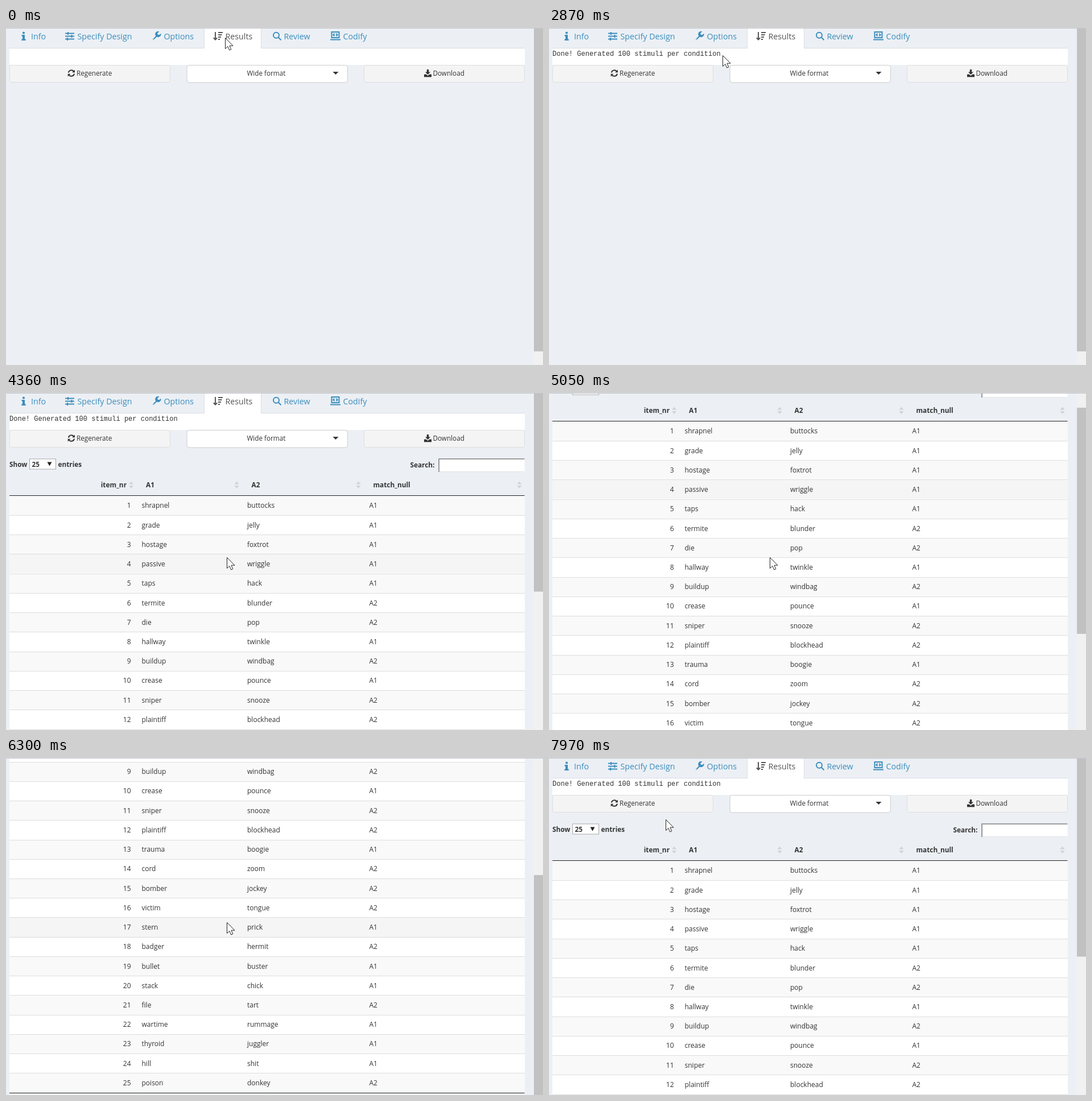
An HTML page for the animation above (8 s loop, 944x593 px).

```html
<!DOCTYPE html>
<html lang="en">
<head>
<meta charset="utf-8">
<title>Stimulus results</title>
<style>
@property --s { syntax: '<number>'; inherits: true; initial-value: 0; }
html, body { margin: 0; width: 100%; height: 100%; overflow: hidden; background: #ecf0f5; }
svg { display: block; width: 944px; height: 593px; animation: scroll 8s linear infinite; }
text { font: 12px "Open Sans", "Noto Sans", sans-serif; fill: #333; white-space: pre; }
.tabs text { font-size: 14.25px; fill: #3c8dbc; }
.tabs .on { fill: #555; }
.btn text { font-size: 11.7px; }
.bold { font-size: 11.8px; font-weight: 700; }
#msg { font: 12.03px "Liberation Mono", "DejaVu Sans Mono", monospace; }
.num { text-anchor: end; }
.ico { fill: none; stroke: #3c8dbc; stroke-width: 2; }
.solid { fill: #3c8dbc; stroke: none; }
.dark { stroke: #333; }
#page { transform: translateY(calc(var(--s) * -1px)); }
#thumb { transform: translateY(calc(var(--s) * .568px)); }
.late { animation: appear 8s step-end infinite; }
.early { animation: vanish 8s step-end infinite; }
#hover { fill: #f5f5f5; animation: hover 8s step-end infinite; }
#cursor { animation: move 8s linear infinite; }
@keyframes scroll {
  0%, 60.5% { --s: 0; }
  67.875%, 68.5% { --s: 366; }
  70.125%, 72.9% { --s: 400; }
  73.625%, 80.2% { --s: 448; }
  83.5%, 84.125% { --s: 176; }
  86.375%, 100% { --s: 0; }
}
@keyframes appear { 0% { visibility: hidden; } 37.125%, 100% { visibility: visible; } }
@keyframes vanish { 0% { visibility: visible; } 37.125%, 100% { visibility: hidden; } }
@keyframes hover {
  0% { transform: translateY(-2000px); }
  50.6% { transform: translateY(0); }
  51.5% { transform: translateY(34px); }
  52.5% { transform: translateY(68px); }
  54% { transform: translateY(102px); }
  78.75% { transform: translateY(548px); }
  86.375% { transform: translateY(102px); }
  92% { transform: translateY(68px); }
  94.5% { transform: translateY(34px); }
  95.5% { transform: translateY(0); }
  96.375%, 100% { transform: translateY(-2000px); }
}
@keyframes move {
  0%, 23.75% { transform: translate(385px, 17px); }
  27.5% { transform: translate(396px, 6px); }
  30.6% { transform: translate(365px, 18px); }
  33.625%, 34.9% { transform: translate(322px, 39px); }
  35.875%, 46.2% { transform: translate(305px, 48px); }
  49.4% { transform: translate(380px, 130px); }
  51.9% { transform: translate(420px, 228px); }
  54.5%, 91.2% { transform: translate(388px, 289px); }
  93.75% { transform: translate(560px, 262px); }
  95.5% { transform: translate(628px, 215px); }
  97.25% { transform: translate(520px, 150px); }
  99.625%, 100% { transform: translate(205px, 108px); }
}
</style>
</head>
<body>
<svg viewBox="0 0 944 593">
  <rect width="944" height="593" fill="#ecf0f5"/>
  <g id="page">
    <g class="tabs">
      <path d="M6 35.5H912" stroke="#d9dde2"/>
      <path d="M348.5 36V-2H448.5V36" fill="#fff" stroke="#dcdfe3"/>
      <rect x="6" y="36" width="906" height="29" fill="#fff"/>
      <rect x="349" y="34" width="99" height="3" fill="#fff"/>
      <text x="44" y="20">Info</text>
      <text x="125.5" y="20">Specify Design</text>
      <text x="277.5" y="20">Options</text>
      <text class="on" x="385.5" y="20">Results</text>
      <text x="488.5" y="20">Review</text>
      <text x="592.5" y="20">Codify</text>
      <circle class="solid" cx="31" cy="8.5" r="2.1"/>
      <path class="solid" d="M27.5 12H33V19.5H34.7V22H27.3V19.5H29V14.5H27.5Z"/>
      <path class="ico" d="M104 9.5H120M104 14.5H120M104 19.5H120" stroke-width="1.8"/>
      <path class="ico" d="M109 7V12M115.5 12V17M108 17V22" stroke-width="2.6"/>
      <path class="ico" d="M259 20L266 13" stroke-width="4" stroke-linecap="round"/>
      <path class="solid" d="M269.5 6.2A5.2 5.2 0 1 0 272.4 9.6L269.4 12.2 266.6 11.6 266.2 9Z"/>
      <circle cx="259.3" cy="19.8" r=".8" fill="#ecf0f5"/>
      <path class="ico on" d="M368 7V20M364.8 17.3L368 20.6 371.2 17.3M373 8H381M373 12H379.5M373 16H378M373 20H376" style="stroke:#555;fill:none"/>
      <circle class="ico" cx="475" cy="12.7" r="5" stroke-width="2.4"/>
      <path class="ico" d="M478.8 16.5L483.5 21.2" stroke-width="3"/>
      <rect class="ico" x="572.5" y="7" width="13" height="10"/>
      <path class="ico" d="M570 20.5H588"/>
      <path class="ico" d="M577.6 9.8L575.4 12 577.6 14.2M580.4 9.8L582.6 12 580.4 14.2" stroke-width="1.4"/>
    </g>
    <text id="msg" x="6" y="49"></text>
    <g class="btn">
      <rect x="6.5" y="65.5" width="282" height="30" rx="3" fill="#f4f4f4" stroke="#ddd"/>
      <rect x="318" y="65.5" width="282.5" height="30.5" rx="4" fill="#fff" stroke="#ccc"/>
      <rect x="629.5" y="65.5" width="282" height="30" rx="3" fill="#f4f4f4" stroke="#ddd"/>
      <text x="124" y="84">Regenerate</text>
      <text x="423.5" y="84">Wide format</text>
      <text x="750.5" y="84">Download</text>
      <path class="ico dark" d="M109.8 78.5A5.2 5.2 0 0 1 119 76.2M120 80.5A5.2 5.2 0 0 1 110.8 82.8"/>
      <path d="M121 73.5V78.3H116.2ZM108.7 85.6V80.8H113.5Z" fill="#333"/>
      <path d="M574.5 77H584.5L579.5 82Z" fill="#333"/>
      <path d="M739.8 73H743.2V77.5H746L741.5 82 737 77.5H739.8ZM735 81.5H738.6L741.5 84 744.4 81.5H748V86.3H735Z" fill="#333"/>
    </g>
    <g class="late">
      <text class="bold" x="6" y="129.5">Show</text>
      <rect x="41.5" y="116" width="46" height="18" fill="#fff" stroke="#a9a9a9"/>
      <text class="bold" x="45.5" y="129.5">25</text>
      <path d="M72.5 121.5H80.5L76.5 128.5Z" fill="#222"/>
      <text class="bold" x="91.5" y="129.5">entries</text>
      <text class="bold" x="710.5" y="131">Search:</text>
      <rect x="760" y="115" width="151.5" height="24" fill="#fff"/>
      <path d="M911 138.5H761" stroke="#e3e3e3"/>
      <path d="M761 139V116H911.5" fill="none" stroke="#7f7f7f" stroke-width="1.6"/>
      <text class="bold num" x="212" y="166">item_nr</text>
      <text class="bold" x="246" y="166">A1</text>
      <text class="bold" x="431.5" y="166">A2</text>
      <text class="bold" x="645.5" y="166">match_null</text>
      <g id="sorts" fill="#d0d4d9"></g>
      <g id="stripes"></g>
      <rect id="hover" x="6" y="181" width="906" height="34"/>
      <g id="rows"></g>
      <path d="M6 180.5H911.5M6 1037.5H911.5" stroke="#222"/>
    </g>
  </g>
  <rect x="928" width="16" height="593" fill="#f1f1f1"/>
  <rect class="early" x="928" width="16" height="569" fill="#c1c1c1"/>
  <g class="late"><rect id="thumb" x="928" y="-48.5" width="16" height="398" fill="#c1c1c1"/></g>
  <path d="M0 .5H944" stroke="#c3c7cf"/>
  <path id="cursor" d="M.5 .5V19.5L4.9 15.4 7.7 22 10.8 20.7 8 14.2H14Z" fill="#fff" stroke="#222"/>
</svg>
<script>
const LOOP = 8000, PITCH = 34.23;
const first = ('shrapnel grade hostage passive taps termite die hallway buildup crease sniper plaintiff ' +
  'trauma cord bomber victim stern badger bullet stack file wartime thyroid hill poison').split(' ');
const second = ('buttocks jelly foxtrot wriggle hack blunder pop twinkle windbag pounce snooze blockhead ' +
  'boogie zoom jockey tongue prick hermit buster chick tart rummage juggler shit donkey').split(' ');
const match = '1111122121221222121121112';
const get = id => document.getElementById(id);
const label = (x, y, s, cls = '') => `<text x="${x}" y="${y}" class="${cls}">${s}</text>`;
const edge = i => Math.round(180.8 + PITCH * i);

let stripes = '', rows = '';
first.forEach((word, i) => {
  const top = edge(i), bottom = edge(i + 1), y = Math.round(202.4 + PITCH * i);
  stripes += `<rect x="6" y="${top}" width="906" height="${bottom - top}" fill="${i % 2 ? '#fff' : '#f9f9f9'}"/>`;
  rows += `<path d="M6 ${bottom + .5}H912" stroke="#ddd"/>` +
    label(219.5, y, i + 1, 'num') + label(238.5, y, word) +
    label(424, y, second[i]) + label(638.5, y, 'A' + match[i]);
});
get('stripes').innerHTML = stripes;
get('rows').innerHTML = rows;
get('sorts').innerHTML = [220, 405.5, 619.5, 902.5].map(x =>
  `<path d="M${x - 4} 160.5h8l-4 -5zM${x - 4} 163h8l-4 5z"/>`).join('');

// start time, items generated, iterations
const counts = [[490, 14, 16], [690, 20, 23], [870, 27, 30], [1200, 35, 40], [1430, 42, 48], [1610, 50, 56],
  [1940, 59, 66], [2080, 66, 74], [2220, 74, 84], [2360, 82, 93], [2500, 90, 103], [2640, 97, 111]];

function message(t) {
  if (t < 180) return '';
  if (t < 490) return 'Generating...';
  if (t >= 2820) return 'Done! Generated 100 stimuli per condition';
  const [, n, tries] = counts.findLast(c => c[0] <= t);
  return `Generated ${n}/100 (${n}%). ${tries} total iterations, ${(n / tries).toFixed(2)} success rate.`;
}

let start;
function tick(now) {
  start ??= now;
  const text = message((now - start) % LOOP);
  if (get('msg').textContent !== text) get('msg').textContent = text;
  requestAnimationFrame(tick);
}
requestAnimationFrame(tick);
</script>
</body>
</html>
```
